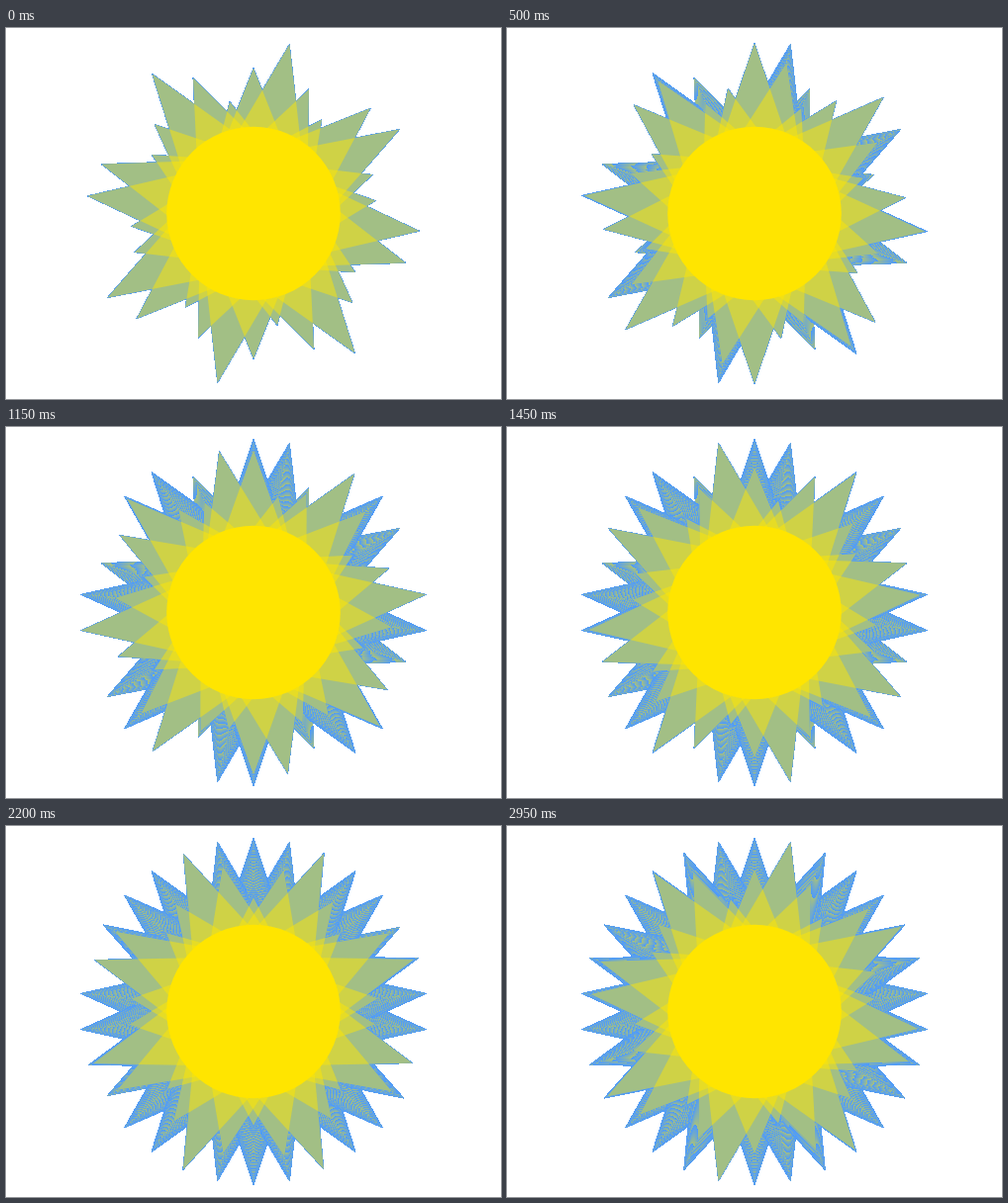
Recreate the animation shown at these times as an HTML page with a canvas. Size 500x375 px, loop 3 s.

```html
<!DOCTYPE html>
<html lang="en">
<head>
<meta charset="utf-8">
<title>Pulsing sun</title>
<style>
  html, body { margin: 0; width: 100%; height: 100%; overflow: hidden; background: #fff; }
  canvas { display: block; }
</style>
</head>
<body>
<canvas id="stage" width="500" height="375"></canvas>
<script>
const W = 500, H = 375, CX = 250, CY = 187.5;
const LOOP = 3000, STEP = 50, STEPS = LOOP / STEP;
const RAYS = 30, WAVES = 8;
const DISC = 87.75, REACH = 145.5, SWING = 30;
const HALF_BASE = DISC * 2 / 3;
const SKY = [76, 154, 255];

const view = document.getElementById('stage').getContext('2d');
const scratch = document.createElement('canvas');
scratch.width = W;
scratch.height = H;
const pen = scratch.getContext('2d', { willReadFrequently: true });
const image = view.createImageData(W, H);
let drawn = -1;

// Each ray is a triangle whose base is centred on the middle of the sun.
function drawRay(angle, length) {
  const dx = Math.sin(angle), dy = -Math.cos(angle);
  pen.beginPath();
  pen.moveTo(CX + dy * HALF_BASE, CY - dx * HALF_BASE);
  pen.lineTo(CX + dx * length, CY + dy * length);
  pen.lineTo(CX - dy * HALF_BASE, CY + dx * HALF_BASE);
  pen.closePath();
  pen.fill();
}

function drawSun(step) {
  pen.fillStyle = `rgb(${SKY})`;
  pen.fillRect(0, 0, W, H);
  const phase = (step + 0.5) / STEPS * 2 * Math.PI;
  pen.fillStyle = 'rgba(255, 229, 0, 0.48)';
  for (let i = 0; i < RAYS; i++) {
    const angle = i / RAYS * 2 * Math.PI;
    drawRay(angle, REACH + SWING * Math.sin(WAVES * angle + phase));
  }
  pen.fillStyle = '#ffe500';
  pen.beginPath();
  pen.arc(CX, CY, DISC, 0, 2 * Math.PI);
  pen.fill();
}

// The sky is keyed out, so every pixel keeps the last colour that touched it.
function addStep(step) {
  drawSun(step);
  const from = pen.getImageData(0, 0, W, H).data, to = image.data;
  for (let p = 0; p < from.length; p += 4) {
    const gap = Math.abs(from[p] - SKY[0]) + Math.abs(from[p + 2] - SKY[2]);
    if (gap < 4) continue;
    to[p] = from[p];
    to[p + 1] = from[p + 1];
    to[p + 2] = from[p + 2];
  }
}

function show(time) {
  const step = Math.floor(time % LOOP / STEP);
  if (step === drawn) return;
  if (drawn < 0 || step < drawn) {
    image.data.fill(255);
    drawn = -1;
  }
  while (drawn < step) addStep(++drawn);
  view.putImageData(image, 0, 0);
}

function tick() {
  show(performance.now() - start);
  requestAnimationFrame(tick);
}

const start = performance.now();
show(0);
requestAnimationFrame(tick);
</script>
</body>
</html>
```
